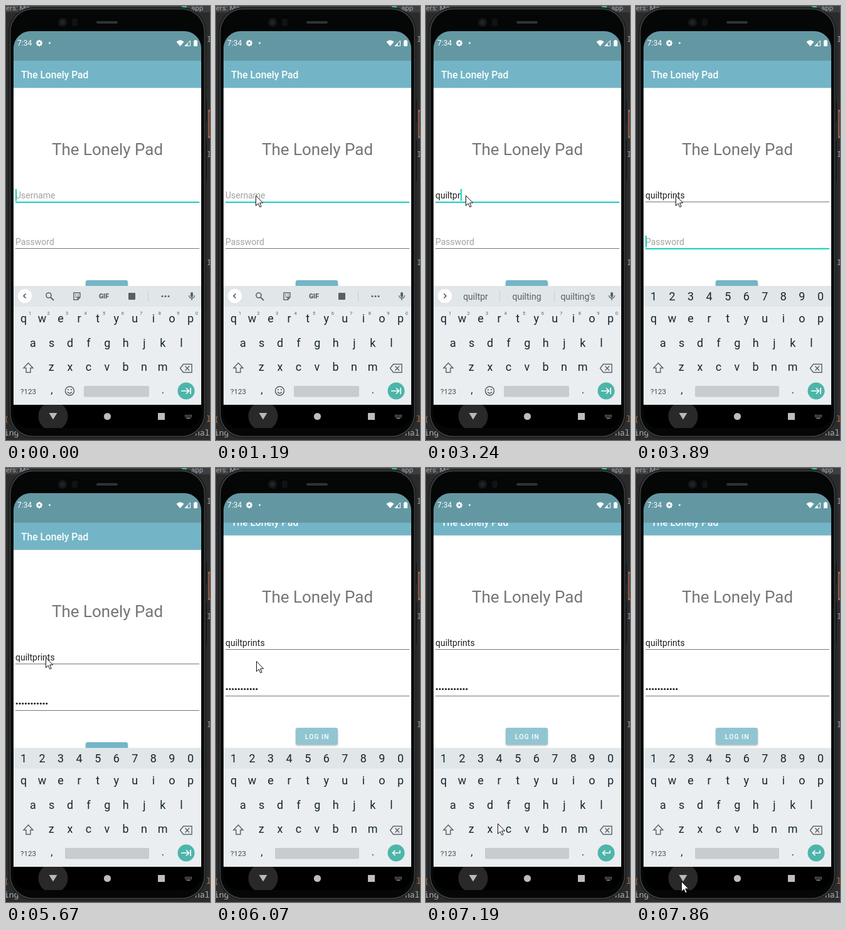
Write an HTML page with a canvas that moves like this. It is 325 px wide and 690 px high and loops after 8 s.

```html
<!DOCTYPE html>
<html lang="en">
<head>
<meta charset="utf-8">
<title>Login screen</title>
<style>
  html, body { margin: 0; width: 100%; height: 100%; overflow: hidden; background: #2b2b2b; }
  canvas { display: block; width: 325px; height: 690px; }
</style>
</head>
<body>
<canvas id="stage" width="325" height="690"></canvas>
<script>
const ctx = document.getElementById('stage').getContext('2d');
const LOOP = 8000;
const STEP = 66;
const APP = 'The Lonely Pad';
const USER = 'quiltprints';
const TYPE_USER = [2450, 2550, 2640, 2740, 2840, 3110, 3200, 3290, 3380, 3490, 3560];
const TYPE_PASS = [4350, 4490, 4600, 4720, 4830, 4940, 5050, 5160, 5270, 5410, 5470];
const CARET_ON = [[0, 190], [690, 1190], [1720, 2250], [2450, 3830]];
const HINTS = [['q', 'quite', 'quick'], ['qu', 'quite', 'quick'], ['qui', 'quite', 'quick'],
  ['quil', 'quilt', 'quill'], ['quilt', 'quilted', 'quilts']];
// Pointer tip: time, x, y
const MOVE_IN = [[390, 275, 600], [520, 170, 450], [650, 85, 330], [780, 63, 301]];
const MOVE_OUT = [[6070, 64, 307], [6400, 85, 431], [6520, 85, 431], [6600, 100, 495],
  [6730, 10, 638], [6860, 70, 610], [7060, 118, 551], [7390, 98, 620], [7590, 70, 647],
  [7720, 72, 651], [7860, 72, 657]];

const INK = '#16262c', GREY = '#596064', TEAL = '#18cfbf', BLUE = '#73b5c6';

function rect(x, y, w, h, color) {
  ctx.fillStyle = color;
  ctx.fillRect(x, y, w, h);
}

function box(x, y, w, h, r, color) {
  ctx.beginPath();
  ctx.roundRect(x, y, w, h, r);
  ctx.fillStyle = color;
  ctx.fill();
}

function disc(x, y, r, color) {
  ctx.beginPath();
  ctx.arc(x, y, r, 0, Math.PI * 2);
  ctx.fillStyle = color;
  ctx.fill();
}

function ring(x, y, r, color, width) {
  ctx.beginPath();
  ctx.arc(x, y, r, 0, Math.PI * 2);
  ctx.strokeStyle = color;
  ctx.lineWidth = width;
  ctx.stroke();
}

function path(d, { fill, stroke, width = 1.5, x = 0, y = 0 }) {
  const shape = new Path2D(d);
  ctx.save();
  ctx.translate(x, y);
  if (fill) { ctx.fillStyle = fill; ctx.fill(shape); }
  if (stroke) { ctx.strokeStyle = stroke; ctx.lineWidth = width; ctx.stroke(shape); }
  ctx.restore();
}

function text(str, x, y, size, color, align = 'left', weight = 400, family = 'Roboto, sans-serif') {
  ctx.font = `${weight} ${size}px ${family}`;
  ctx.textAlign = align;
  ctx.fillStyle = color;
  ctx.fillText(str, x, y);
}

const countUntil = (times, t) => times.filter(at => t >= at).length;

function along(keys, t) {
  const start = keys[0][0];
  t = start + Math.floor((t - start) / STEP) * STEP;
  const i = Math.min(keys.findLastIndex(k => t >= k[0]), keys.length - 2);
  const [t0, x0, y0] = keys[i], [t1, x1, y1] = keys[i + 1];
  const p = Math.min(1, (t - t0) / (t1 - t0));
  return [x0 + (x1 - x0) * p, y0 + (y1 - y0) * p];
}

function pointerAt(t) {
  if (t < 390) return null;
  if (t < 780) return along(MOVE_IN, t);
  if (t < 6070) return [63, 301];
  return t >= 7860 ? [72, 657] : along(MOVE_OUT, t);
}

function scrollAt(t) {
  if (t < 5740) return 0;
  const p = Math.min(1, Math.floor((t - 5673) / STEP) / 3);
  return Math.round(23 * (1 - (1 - p) ** 2));
}

function drawDesk() {
  const mono = '"Noto Sans Mono", monospace';
  rect(0, 0, 325, 690, '#2b2b2b');
  rect(0, 0, 325, 10, '#3c3f41');
  text('ers: Mo', 0, 7, 11.5, '#a9adb0');
  disc(284, 1, 4, '#36b99a');
  text('app', 295, 7, 11.5, '#a9adb0');
  rect(322, 165, 3, 45, '#a9644f');
  rect(323, 168, 2, 39, '#6b473e');
  for (const y of [57, 240, 412]) text('I', 320, y, 12, '#9ba4a8', 'left', 400, mono);
  text('(', -3, 661, 13, '#bd7640', 'left', 400, mono);
  text('l', 319, 661, 13, '#bd7640', 'left', 400, mono);
  text('ing', -3, 683, 13, '#a9b3bd', 'left', 400, mono);
  text('nal', 301, 683, 13, '#a9b3bd', 'left', 400, mono);
}

function drawPhone() {
  box(317, 150, 3, 34, 1, '#151515');
  box(317, 213, 3, 66, 1, '#151515');
  box(4, 2, 315, 685, 39, '#17191a');
  box(5.5, 3.5, 312, 682, 37.5, '#393c3e');
  box(7.5, 5.5, 308, 678, 35.5, '#050606');
  disc(90, 26, 7, '#15171a');
  disc(90, 26, 3.5, '#202328');
  box(105, 20, 9, 12, 3, '#101213');
  box(144, 24, 34, 4, 2, '#303335');
}

function drawStatusBar() {
  rect(12, 40, 299, 47, '#6398a3');
  text('7:34', 18, 63, 12, '#fff');
  for (let i = 0; i < 8; i++) {
    const a = i * Math.PI / 4;
    disc(53 + 3.9 * Math.cos(a), 59 + 3.9 * Math.sin(a), 1.3, '#fff');
  }
  ring(53, 59, 2.8, '#fff', 2.2);
  disc(69.5, 59, 1.4, '#fff');
  path('M271.5 57 Q277.5 51.5 283.5 57 L277.5 64 Z', { fill: '#fff' });
  path('M285 63.5 H293.5 V55 Z', { stroke: '#fff', width: 1 });
  path('M289.5 59 V63.5 H285 Z', { fill: '#fff' });
  box(299, 55, 6, 9, 1, '#fff');
  rect(300.5, 54, 3, 1, '#fff');
}

function drawField(y, focused) {
  if (focused) rect(15, y, 293, 2, TEAL);
  else rect(15, y, 293, 1, '#777');
}

function drawCaret(x, y) {
  rect(Math.round(x), y, 2, 19, TEAL);
}

function drawForm(t) {
  const typed = countUntil(TYPE_USER, t), dots = countUntil(TYPE_PASS, t);
  const onUser = t < 3830, onPass = !onUser && t < 5670, onButton = t >= 5740;
  const name = USER.slice(0, typed);

  ctx.save();
  ctx.beginPath();
  ctx.rect(12, 87, 299, 358);
  ctx.clip();
  rect(12, 87, 299, 358, '#fff');
  ctx.translate(0, -scrollAt(t));

  rect(12, 87, 299, 43, BLUE);
  rect(12, 130, 299, 1, '#e4e7e8');
  text(APP, 24, 115, 15.6, '#fff', 'left', 500);
  text(APP, 161.5, 237, 26, '#757575', 'center');

  if (typed) text(name, 15, 306, 14, '#202020');
  else text('Username', 15, 306, 14, '#a1a1a1');
  drawField(311, onUser);
  if (CARET_ON.some(([a, b]) => t >= a && t < b)) {
    ctx.font = '400 14px Roboto, sans-serif';
    drawCaret(15 + ctx.measureText(name).width, 291);
  }

  if (!dots) text('Password', 15, 380, 14, '#a1a1a1');
  for (let i = 0; i < dots; i++) disc(17.3 + i * 4.75, 374.5, 1.6, '#202020');
  drawField(385, onPass);
  if (onPass) drawCaret(15 + dots * 4.75, 365);

  ctx.save();
  ctx.shadowColor = 'rgba(0,0,0,.28)';
  ctx.shadowBlur = 3;
  ctx.shadowOffsetY = 1.5;
  box(127, 436, 67, 27, 3, onButton ? '#92c5d2' : BLUE);
  ctx.restore();
  ctx.letterSpacing = '1px';
  text('LOG IN', 161.3, 454, 10.6, '#fff', 'center', 500);
  ctx.letterSpacing = '0px';
  ctx.restore();
}

function drawMic() {
  box(294, 455, 4, 8, 2, GREY);
  path('M291.5 460 a4.5 4.5 0 0 0 9 0 M296 464.5 V468', { stroke: GREY, width: 1.3 });
}

function drawToolbar() {
  path('M31.5 457.5 L28 461 L31.5 464.5', { stroke: '#454b4f' });
  ring(68, 460, 4, GREY, 1.6);
  path('M71 463 L76 468', { stroke: GREY, width: 1.8 });
  path('M108 456 H118 V463 L114.5 467 H108 Z M118 463 H114.5 V467', { stroke: GREY, width: 1.4 });
  disc(111, 459.5, 0.9, GREY);
  disc(115, 459.5, 0.9, GREY);
  path('M110.5 462 Q113 464.5 115.5 462', { stroke: GREY, width: 1.1 });
  text('GIF', 156, 465, 10.5, GREY, 'center', 900);
  box(195, 456, 11, 11, 1, GREY);
  rect(226, 453, 1, 17, '#c7ccd0');
  for (const x of [249, 254, 259]) disc(x, 461.5, 1.5, GREY);
}

function drawHints(typed) {
  path('M28.5 457.5 L32 461 L28.5 464.5', { stroke: '#454b4f' });
  if (typed === USER.length) return text(USER, 160.5, 467, 14, GREY, 'center');
  const words = HINTS[typed - 1] || [USER.slice(0, typed), 'quilting', "quilting's"];
  words.forEach((word, i) => text(word, 79 + i * 81.5, 467, 14, GREY, 'center'));
  rect(117, 452, 1, 19, '#c9ced1');
  rect(204, 452, 1, 19, '#c9ced1');
}

function drawEnter(isReturn) {
  disc(287, 612, 13.5, '#4db5aa');
  const icon = isReturn
    ? 'M293 608 V612 H281.5 M285.5 608 L281.5 612 L285.5 616'
    : 'M279 612 H291 M287 607.5 L291.5 612 L287 616.5 M294 607 V617';
  path(icon, { stroke: '#fff', width: 1.7 });
}

function drawKeyRow(keys, x, y) {
  [...keys].forEach((key, i) => text(key, x + i * 29.55, y, 18, INK, 'center'));
}

function drawKeyboard(t) {
  const numeric = t >= 3890, typed = countUntil(TYPE_USER, t);
  rect(12, 445, 299, 189, '#eaeef0');
  rect(12, 445, 299, 33, '#e1e6e9');

  if (numeric) {
    drawKeyRow('1234567890', 28, 468);
  } else {
    disc(30, 462, 11.8, '#d0d5d8');
    disc(30, 461.3, 11.5, '#fff');
    typed ? drawHints(typed) : drawToolbar();
    drawMic();
    [...'1234567890'].forEach((d, i) => text(d, 38 + i * 29.55, 491, 7.5, GREY, 'center'));
  }

  drawKeyRow('qwertyuiop', 28, 503);
  drawKeyRow('asdfghjkl', 43, 542);
  drawKeyRow('zxcvbnm', 72.3, 580);
  path('M35.5 567.5 L43 575.5 H39 V582.5 H32 V575.5 H28 Z', { stroke: GREY, width: 1.4 });
  path('M277.5 576 L282.5 569.5 H296 V582.5 H282.5 Z M285.5 572.5 L292 579.5 M292 572.5 L285.5 579.5',
    { stroke: GREY, width: 1.4 });

  text('?123', 35.5, 616.5, 11.5, '#40494d', 'center');
  text(',', 73, 616, 17, INK, 'center');
  text('.', 250, 616, 17, INK, 'center');
  const spaceX = numeric ? 94 : 124;
  box(spaceX, 604, 228 - spaceX, 17.5, 2, '#c7ccd0');
  if (!numeric) {
    ring(101.5, 612, 7, GREY, 1.5);
    disc(99, 610, 1.1, GREY);
    disc(104, 610, 1.1, GREY);
    path('M98 613.5 Q101.5 618 105 613.5', { stroke: GREY, width: 1.3 });
  }
  drawEnter(t >= 5740);
}

function drawNavBar() {
  rect(12, 634, 299, 37, '#000');
  ctx.save();
  ctx.beginPath();
  ctx.rect(12, 634, 299, 37);
  ctx.clip();
  disc(75, 652, 23.5, '#292929');
  ctx.restore();
  path('M68.5 647 H81.5 L75 657.5 Z', { fill: '#b9b9b9' });
  disc(161.5, 652.5, 5.6, '#bdbdbd');
  rect(242, 647, 11, 11, '#bdbdbd');
  for (let i = 0; i < 5; i++) {
    rect(285 + i * 2.4, 650, 1.4, 1.3, '#aaa');
    rect(285 + i * 2.4, 652.4, 1.4, 1.3, '#aaa');
  }
  rect(287.4, 654.8, 6.2, 1.2, '#aaa');
}

function drawPointer(t) {
  const tip = pointerAt(t);
  if (!tip) return;
  path('M.5 .5 V16.5 L4.2 13 L6.8 18.7 L9.2 17.6 L6.7 12 H11.7 Z',
    { fill: '#fff', stroke: '#111', width: 1, x: Math.round(tip[0]), y: Math.round(tip[1]) });
}

function draw(t) {
  drawDesk();
  drawPhone();
  ctx.save();
  ctx.beginPath();
  ctx.roundRect(12, 40, 299, 631, [27, 27, 24, 24]);
  ctx.clip();
  drawStatusBar();
  drawForm(t);
  drawKeyboard(t);
  drawNavBar();
  ctx.restore();
  drawPointer(t);
}

const start = performance.now();
function tick() {
  draw((performance.now() - start) % LOOP);
  requestAnimationFrame(tick);
}
tick();
</script>
</body>
</html>
```
